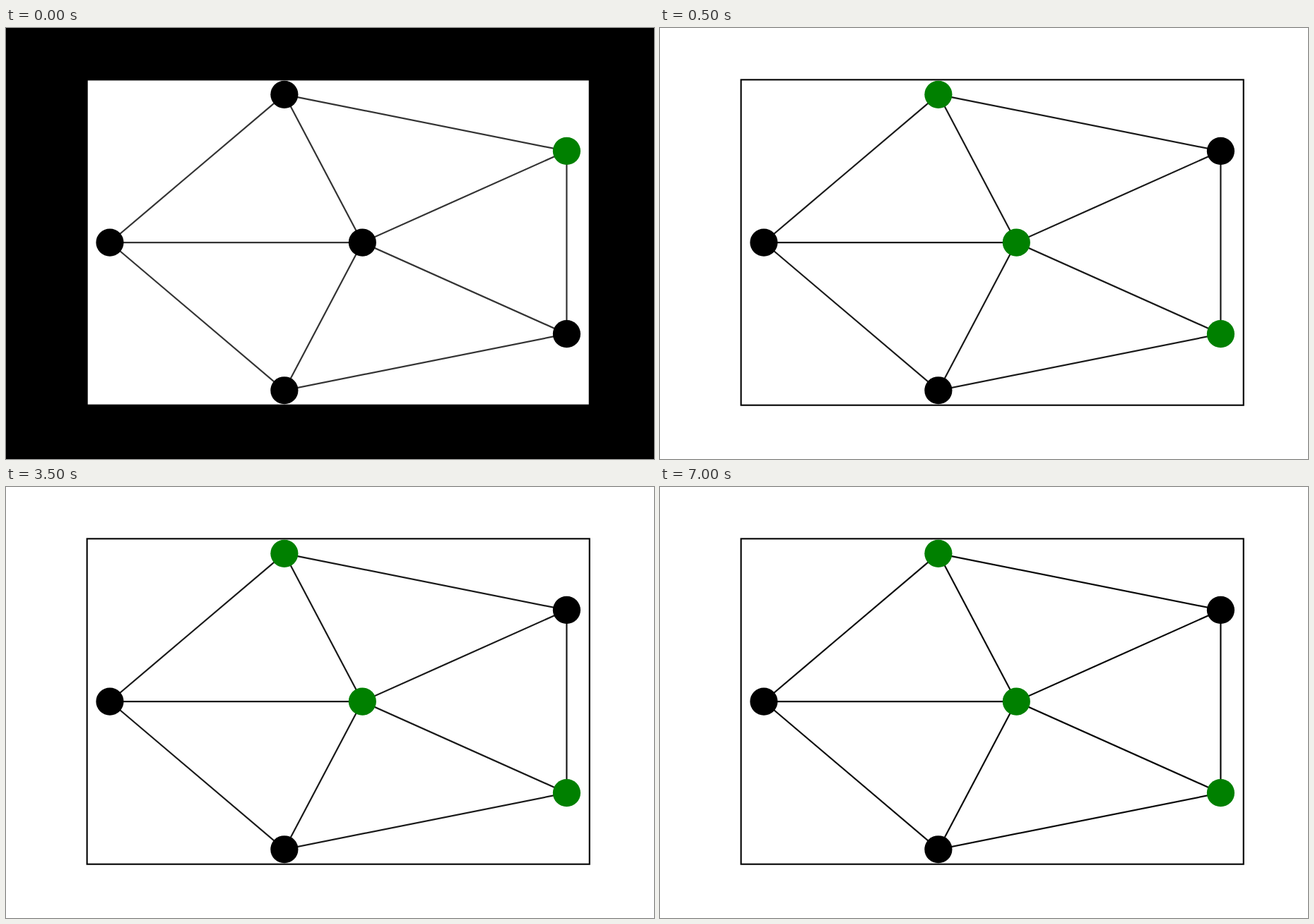
Animation of 917 by 611 pixels, one loop 8 s. Source, as an HTML page:

```html
<!DOCTYPE html>
<html lang="en">
<head>
<meta charset="utf-8">
<title>Wheel graph node states</title>
<style>
  html, body { margin: 0; width: 100%; height: 100%; overflow: hidden; background: #fff; }
  svg { display: block; width: 100%; height: 100%; }
</style>
</head>
<body>
<svg id="stage" viewBox="0 0 917 611"></svg>
<script>
const LOOP = 8000;
const RIM = 5, HUB = RIM;
const box = { x: 114.65, y: 73.35, width: 711.1, height: 461.35 };
const states = [
  { start: 0, page: '#000', line: '#333', active: [2] },
  { start: 500, page: '#fff', line: '#191919', active: [1, 3, HUB] },
  { start: 5500, page: '#fff', line: '#0a0a0a', active: [1, 3, HUB] }
];

const stage = document.getElementById('stage');

function add(tag, attrs, parent = stage) {
  const el = document.createElementNS('http://www.w3.org/2000/svg', tag);
  for (const key in attrs) el.setAttribute(key, attrs[key]);
  return parent.appendChild(el);
}

// A regular pentagon plus its hub, fitted to the box with a 5% margin.
const unit = Array.from({ length: RIM }, (_, i) => {
  const a = Math.PI * (1 + 2 * i / RIM);
  return [Math.cos(a), Math.sin(a)];
});
unit.push([0, 0]);

function fit(axis, from, size) {
  const values = unit.map(p => p[axis]);
  const low = Math.min(...values), span = Math.max(...values) - low;
  return values.map(v => from + size * ((v - low) / span + 0.05) / 1.1);
}
const xs = fit(0, box.x, box.width);
const ys = fit(1, box.y, box.height);

const page = add('rect', { width: 917, height: 611 });
add('rect', { ...box, fill: '#fff', stroke: '#000', 'stroke-width': 2.1 });
const lines = add('g', { 'stroke-width': 2.2 });

function link(a, b) {
  add('line', { x1: xs[a], y1: ys[a], x2: xs[b], y2: ys[b] }, lines);
}
for (let i = 0; i < RIM; i++) {
  link(i, (i + 1) % RIM);
  link(i, HUB);
}
const dots = xs.map((cx, i) => add('circle', { cx, cy: ys[i], r: 19.6 }));

function draw(t) {
  const state = states.findLast(s => t >= s.start);
  page.setAttribute('fill', state.page);
  lines.setAttribute('stroke', state.line);
  dots.forEach((dot, i) => dot.setAttribute('fill', state.active.includes(i) ? '#008000' : '#000'));
}

const begin = performance.now();
function tick() {
  draw((performance.now() - begin) % LOOP);
  requestAnimationFrame(tick);
}
tick();
</script>
</body>
</html>
```
